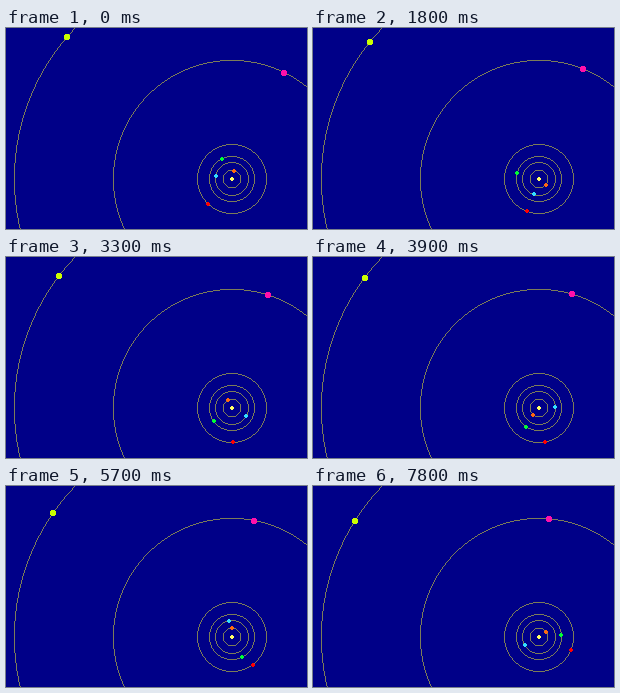
Write an HTML page with a canvas that moves like this. It is 301 by 201 pixels and loops after 8 s.

```html
<!DOCTYPE html>
<html lang="en">
<head>
<meta charset="utf-8">
<title>Planet orbits</title>
<style>
html, body { margin: 0; width: 100%; height: 100%; overflow: hidden; background: #000088; }
canvas { display: block; }
</style>
</head>
<body>
<canvas id="stage" width="301" height="201"></canvas>
<script>
const ctx = document.getElementById('stage').getContext('2d');
const CX = 226, CY = 151, RAD = Math.PI / 180;
const LOOP = 8000, STEP = 300, DAYS = 10;

// r: orbit radius, lon: mean longitude at start, rate: degrees per day,
// e: eccentricity, peri: longitude of perihelion, d: dot size
const planets = [
  { r: 8.8, lon: 92, rate: 4.0923, e: 0.2056, peri: 213, d: 4, color: '#ff6a10' },
  { r: 16.4, lon: 170.9, rate: 1.6021, e: 0.0068, peri: 267, d: 4, color: '#33ddff' },
  { r: 22.6, lon: 117.9, rate: 0.9856, e: 0.0167, peri: 238.5, d: 4, color: '#00ff33' },
  { r: 34.5, lon: 215.3, rate: 0.524, e: 0.0934, peri: 111.5, d: 4, color: '#ff0000' },
  { r: 118.6, lon: 69.4, rate: 0.0831, e: 0.0484, peri: 150.2, d: 6, color: '#ff10aa' },
  { r: 217.6, lon: 145.4, rate: 0.0334, e: 0.054, peri: 228, d: 6, color: '#ccff00' }
];

function pixel(x, y) {
  ctx.fillRect(Math.floor(CX + x), Math.floor(CY + y), 1, 1);
}

// One-pixel circle without smoothing, mirrored from one octant
function ring(r) {
  for (let x = 0.5; x <= r * Math.SQRT1_2 + 0.5; x++) {
    const y = Math.sqrt(r * r - x * x);
    for (const sx of [-x, x]) {
      for (const sy of [-y, y]) {
        pixel(sx, sy);
        pixel(sy, sx);
      }
    }
  }
}

function dot(x, y, d, color) {
  const left = Math.round(x) - d / 2, top = Math.round(y) - d / 2;
  ctx.fillStyle = color;
  ctx.fillRect(left + 1, top, d - 2, d);
  ctx.fillRect(left, top + 1, d, d - 2);
}

// Longitude in radians, with the equation of the centre
function longitude({ lon, rate, e, peri }, days) {
  const mean = (lon + rate * days) * RAD;
  const m = mean - peri * RAD;
  return mean + (2 * e - e ** 3 / 4) * Math.sin(m)
    + 1.25 * e * e * Math.sin(2 * m)
    + 13 / 12 * e ** 3 * Math.sin(3 * m);
}

function draw(now) {
  const days = DAYS * Math.max(0, Math.floor(now % LOOP / STEP) - 1);
  ctx.fillStyle = '#000088';
  ctx.fillRect(0, 0, 301, 201);
  ctx.fillStyle = '#7c7c58';
  for (const p of planets) ring(p.r);
  dot(CX, CY, 4, '#ffff66');
  for (const p of planets) {
    const a = longitude(p, days);
    dot(CX + p.r * Math.cos(a), CY - p.r * Math.sin(a), p.d, p.color);
  }
}

const start = performance.now();
function tick() {
  draw(performance.now() - start);
  requestAnimationFrame(tick);
}
tick();
</script>
</body>
</html>
```
